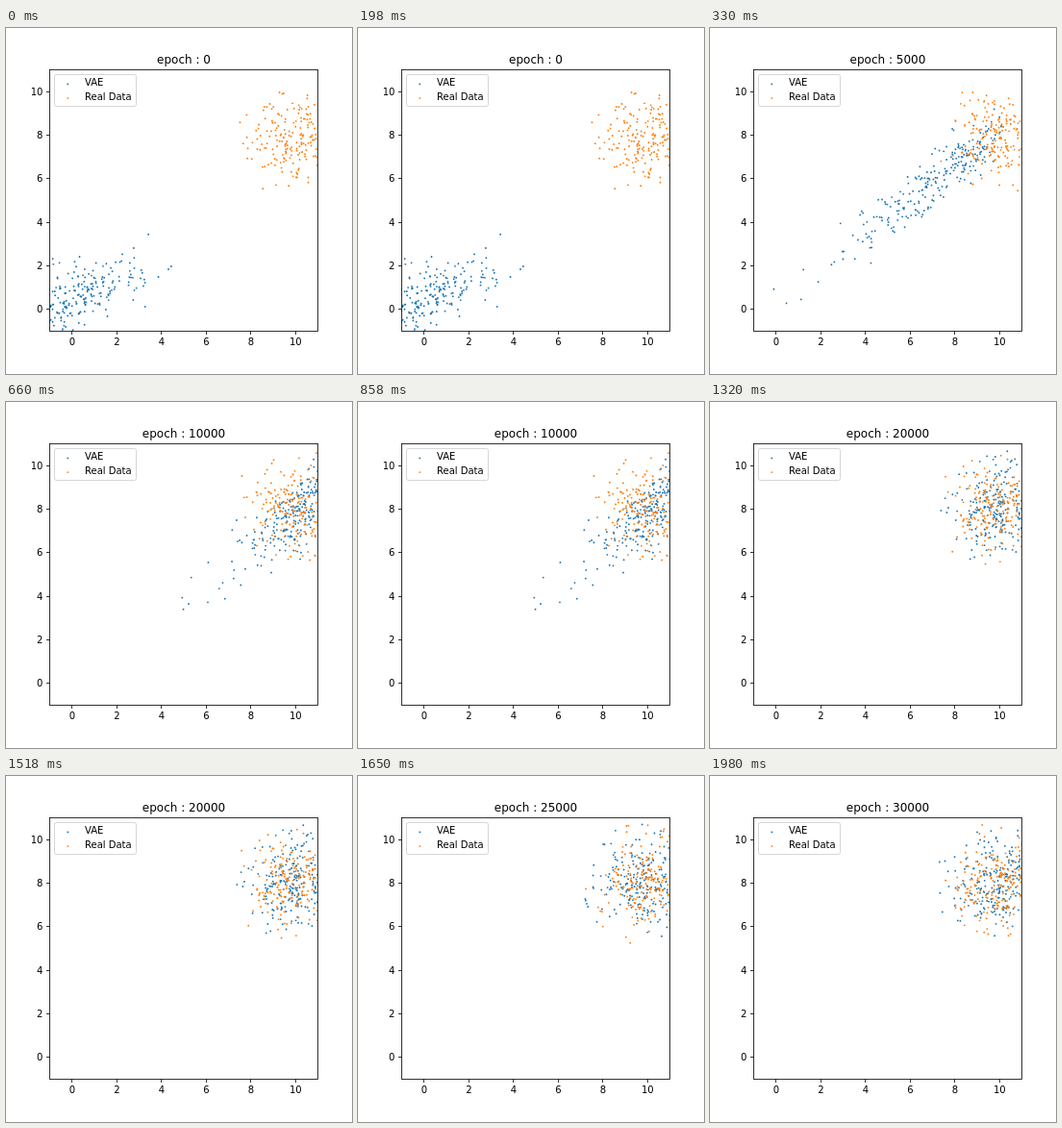
Recreate the animation shown at these times as an HTML page. Size 360 px wide and 360 px high, loop 2.31 s.

```html
<!DOCTYPE html>
<html lang="en">
<head>
<meta charset="utf-8">
<title>Scatter by epoch</title>
<style>
  html, body { margin: 0; width: 100%; height: 100%; overflow: hidden; background: #fff; }
  svg { display: block; width: 360px; height: 360px; }
  text { font: 10px "DejaVu Sans", sans-serif; fill: #000; }
  .title { font-size: 12px; }
  .mid { text-anchor: middle; }
  .end { text-anchor: end; }
  .dots { fill: none; stroke-width: 1.9; stroke-linecap: round; }
  .vae { stroke: #1f77b4; }
  .real { stroke: #ff7f0e; }
  .axis { fill: none; stroke: #000; stroke-width: .8; }
  .epoch { visibility: hidden; animation: show 2310ms step-end infinite; }
  @keyframes show {
    0% { visibility: visible; }
    14.2857%, 100% { visibility: hidden; }
  }
</style>
</head>
<body>
<svg viewBox="0 0 360 360">
  <clipPath id="plot"><rect x="45" y="43.2" width="279" height="271.8"/></clipPath>
  <g id="epochs"></g>
  <g id="axes"><rect class="axis" x="45.5" y="43.5" width="279" height="272"/></g>
  <rect x="50.5" y="48.5" width="85" height="33" rx="2" fill="#fff" fill-opacity=".8" stroke="#ccc" stroke-opacity=".8"/>
  <path class="dots vae" d="M64.3 58.4h0"/>
  <path class="dots real" d="M64.3 73.1h0"/>
  <text x="82" y="60">VAE</text>
  <text x="82" y="75">Real Data</text>
</svg>
<script>
const STEP = 330, COUNT = 7;
const px = x => 68.25 + 23.25 * x;
const py = y => 292.35 - 22.65 * y;
const snap = v => Math.floor(v + .5) + .5;

function add(parent, tag, attrs, text = '') {
  const el = document.createElementNS('http://www.w3.org/2000/svg', tag);
  for (const k in attrs) el.setAttribute(k, attrs[k]);
  el.textContent = text;
  return parent.appendChild(el);
}

function random(seed) {
  return () => {
    seed = seed + 0x6D2B79F5 | 0;
    let t = Math.imul(seed ^ seed >>> 15, 1 | seed);
    t = t + Math.imul(t ^ t >>> 7, 61 | t) ^ t;
    return ((t ^ t >>> 14) >>> 0) / 4294967296;
  };
}

// Gaussian cloud as path data: y leans on x by slope, skew stretches the left tail
function cloud(seed, count, { x, y, sx = 1, sy = 1, slope = 0, skew = 0 }) {
  const rnd = random(seed);
  let d = '';
  for (let i = 0; i < count; i++) {
    const r = Math.min(2.8, Math.sqrt(-2 * Math.log(1 - rnd())));
    const a = 2 * Math.PI * rnd();
    const g = r * Math.cos(a);
    const dx = sx * (g - skew * (g * g - 1));
    const dy = slope * dx + sy * r * Math.sin(a);
    d += `M${px(x + dx).toFixed(2)} ${py(y + dy).toFixed(2)}h0`;
  }
  return d;
}

// The model's cloud travels to the real data and then stays on it
const real = { x: 9.95, y: 7.95 };
const learning = [
  { x: .4, y: .65, sx: 1.5, sy: .8, slope: .35, skew: -.1 },
  { x: 7.2, y: 5.9, sx: 2, sy: .65, slope: .79, skew: .2 },
  { x: 9.7, y: 7.5, sx: 1.25, sy: .8, slope: .8, skew: .15 }
];

const stage = document.getElementById('epochs');
for (let i = 0; i < COUNT; i++) {
  const g = add(stage, 'g', { class: 'epoch', style: `animation-delay:${(i - COUNT) * STEP}ms` });
  add(g, 'text', { class: 'title mid', x: 185, y: 37 }, `epoch : ${i * 5000}`);
  const clip = add(g, 'g', { 'clip-path': 'url(#plot)' });
  add(clip, 'path', { class: 'dots vae', d: cloud(11 + i, 250, learning[i] || real) });
  add(clip, 'path', { class: 'dots real', d: cloud(71 + i, 205, real) });
}

const axes = document.getElementById('axes');
for (let v = 0; v <= 10; v += 2) {
  const x = snap(px(v)), y = snap(py(v));
  add(axes, 'path', { class: 'axis', d: `M${x} 315.5v3.5M45.5 ${y}h-3.5` });
  add(axes, 'text', { class: 'mid', x: px(v) + .6, y: 330 }, v);
  add(axes, 'text', { class: 'end', x: 38.4, y: Math.round(py(v) + 3.8) }, v);
}
</script>
</body>
</html>
```
